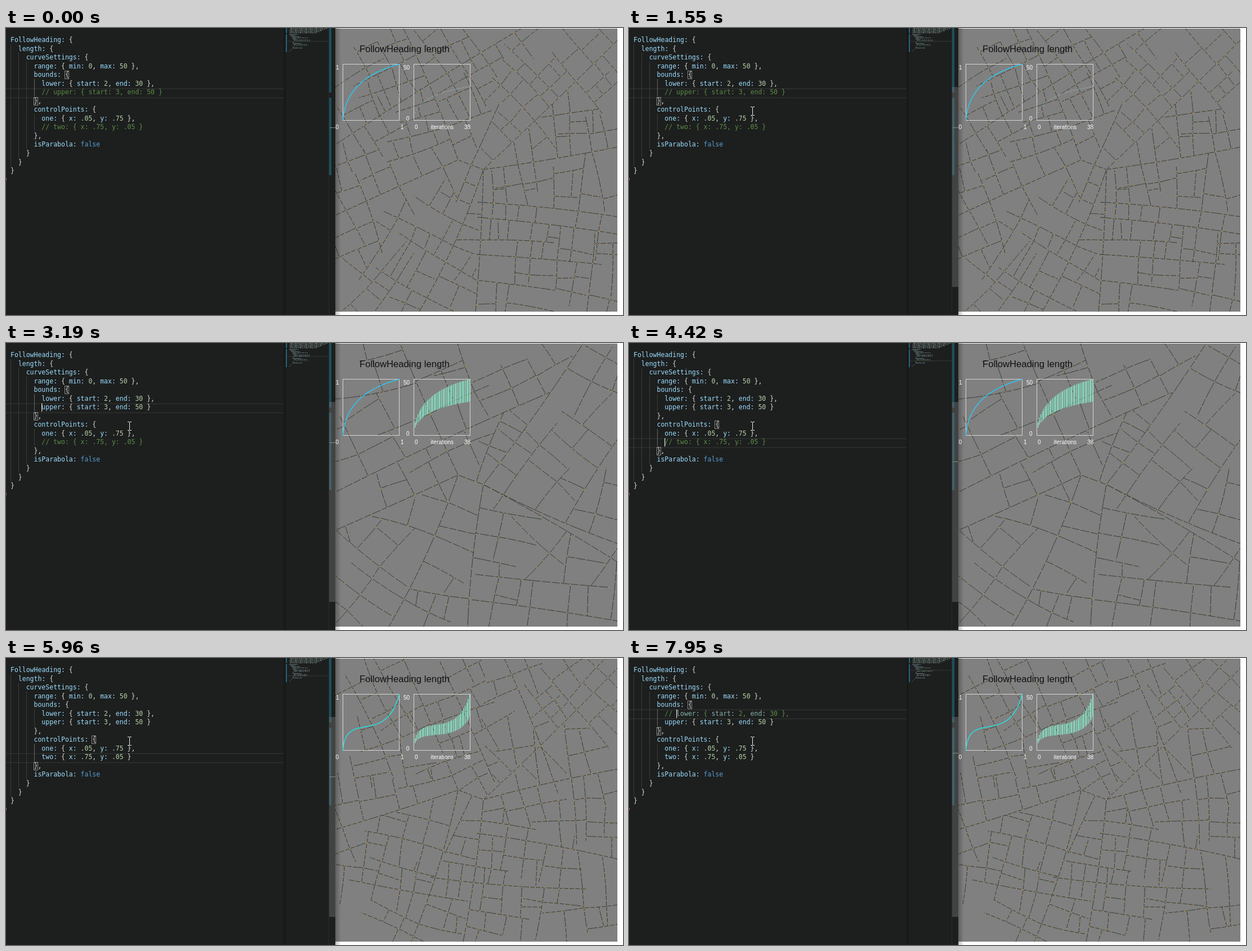
An HTML page with a canvas for the animation above (8000 ms loop, 1096 by 511 pixels).

```html
<!DOCTYPE html>
<html lang="en">
<head>
<meta charset="utf-8">
<title>Curve settings</title>
<style>
html, body { margin: 0; width: 100%; height: 100%; overflow: hidden; background: #fff; }
canvas { display: block; }
</style>
</head>
<body>
<canvas id="stage" width="1096" height="511"></canvas>
<script>
const LOOP = 8000, CHAR = 6.92, LEFT = 8, TOP = 21, PITCH = 15.54;
const ctx = document.getElementById('stage').getContext('2d');
const lineY = i => TOP + i * PITCH;
const colX = c => LEFT + c * CHAR;
const clamp = v => Math.max(0, Math.min(1, v));
const ease = p => p * p * (3 - 2 * p);

function rect(x, y, w, h, color) {
  ctx.fillStyle = color;
  ctx.fillRect(x, y, w, h);
}

function seeded(seed) {
  return () => {
    seed = (seed * 16807) % 2147483647;
    return seed / 2147483647;
  };
}

// ---- street maps: avenues from two hubs, side streets grown from them ----
const HUBS = [[803, 235], [848, 252]];
const cities = [
  {
    seed: 71, gap: 34, reach: 88, joint: 11,
    spokes: [[734, 505], [834, 505], [1086, 212], [1086, 22], [706, 1], [586, 333]],
    links: [[586, 207, 915, 1], [836, 310, 1086, 336], [836, 337, 1086, 367], [834, 403, 1058, 421]]
  },
  {
    seed: 52, gap: 58, reach: 120, joint: 17,
    spokes: [[680, 505], [820, 505], [1086, 390], [1086, 357], [1025, 1], [700, 1], [586, 333]],
    links: [[586, 265, 966, 88], [826, 457, 1086, 495], [834, 412, 1070, 435], [586, 333, 712, 433]]
  },
  {
    seed: 93, gap: 35, reach: 92, joint: 10,
    spokes: [[720, 505], [812, 505], [1086, 198], [1086, 18], [706, 1], [586, 305]],
    links: [[770, 5, 868, 222], [885, 1, 980, 240], [835, 312, 1086, 358], [752, 390, 1032, 411], [610, 395, 820, 433]]
  }
].map(city => drawCity(growCity(city), city.joint));

function avenue(x0, y0, x1, y1, bend) {
  const dx = x1 - x0, dy = y1 - y0, n = Math.ceil(Math.hypot(dx, dy) / 2);
  return Array.from({ length: n + 1 }, (_, i) => {
    const u = i / n, sag = bend * 4 * u * (1 - u);
    return [x0 + dx * u - dy * sag, y0 + dy * u + dx * sag];
  });
}

function growCity({ seed, gap, reach, spokes, links }) {
  const random = seeded(seed), spread = () => random() - .5;
  const taken = new Set(), roads = [];
  const cell = (x, y) => Math.floor(x / 5) * 1000 + Math.floor(y / 5);
  const inside = (x, y) => x > 585 && x < 1086 && y > 1 && y < 505;
  const add = (points, depth) => {
    points.forEach(p => taken.add(cell(...p)));
    roads.push({ points, depth });
  };

  // walk until another road, the edge or the length limit is met
  const grow = (x, y, heading) => {
    const points = [[x, y]], turn = spread() * .008, limit = reach * (.6 + random());
    for (let d = 2; d < limit; d += 2) {
      x += 2 * Math.cos(heading);
      y += 2 * Math.sin(heading);
      heading += turn;
      points.push([x, y]);
      if (!inside(x, y) || d > 8 && taken.has(cell(x, y))) break;
    }
    return points;
  };

  // a new street needs free ground on both sides
  const crowded = (x, y, a) => [-14, -7, 0, 7, 14].some(s =>
    taken.has(cell(x + 16 * Math.cos(a) - s * Math.sin(a), y + 16 * Math.sin(a) + s * Math.cos(a))));

  add(avenue(...HUBS[0], ...HUBS[1], 0), 0);
  for (const end of spokes) {
    const [near] = [...HUBS].sort((a, b) =>
      Math.hypot(a[0] - end[0], a[1] - end[1]) - Math.hypot(b[0] - end[0], b[1] - end[1]));
    add(avenue(...near, ...end, spread() * .05), 0);
  }
  for (const link of links) add(avenue(...link, spread() * .04), 0);

  for (const { points, depth } of roads) {
    if (depth > 2) continue;
    for (let i = Math.round(gap * (.3 + random() * .3)); i < points.length - 4; i += Math.round(gap * (.3 + random() * .4))) {
      const [x, y] = points[i], [px, py] = points[i - 1];
      for (const side of [-1, 1]) {
        const heading = Math.atan2(y - py, x - px) + side * Math.PI / 2 + spread() * .2;
        if (random() < .25 || crowded(x, y, heading)) continue;
        const street = grow(x, y, heading);
        if (street.length > 9) add(street, depth + 1);
      }
    }
  }
  return roads;
}

function drawCity(roads, joint) {
  const map = document.createElement('canvas');
  map.width = 1096;
  map.height = 511;
  const g = map.getContext('2d');
  g.beginPath();
  g.rect(585, 1, 501, 504);
  g.clip();
  g.fillStyle = '#808080';
  g.fillRect(585, 1, 501, 504);
  g.strokeStyle = '#343834';
  for (const { points } of roads) {
    g.beginPath();
    points.forEach(p => g.lineTo(...p));
    g.stroke();
  }
  let n = 0;
  for (const { points } of roads) {
    for (let d = 0; d < points.length; d += joint / 2) {
      const [x, y] = points[Math.floor(d)];
      g.fillStyle = n++ % 6 ? '#bd9a58' : '#4f7a58';
      g.fillRect(x - .8, y - .8, 1.6, 1.6);
    }
  }
  return map;
}

// ---- editor ----
// caret moves: time, line
const moves = [
  [0, 6], [1070, 6], [2080, 6], [3100, 6], [3800, 7], [4030, 8], [4200, 9], [4420, 10],
  [5200, 10], [6210, 9], [6530, 8], [6700, 7], [6870, 6], [7010, 5], [7870, 5]
];
const moveAt = t => moves.findLast(m => m[0] <= t) || moves[0];
const caretCol = t => t < 2080 ? 9 : t < 7870 ? 8 : 11;

function codeAt(t) {
  const off = on => on ? '// ' : '';
  return [
    'FollowHeading: {',
    '  length: {',
    '    curveSettings: {',
    '      range: { min: 0, max: 50 },',
    '      bounds: {',
    `        ${off(t >= 7870)}lower: { start: 2, end: 30 },`,
    `        ${off(t < 3100)}upper: { start: 3, end: 50 }`,
    '      },',
    '      controlPoints: {',
    '        one: { x: .05, y: .75 },',
    `        ${off(t < 5200)}two: { x: .75, y: .05 }`,
    '      },',
    '      isParabola: false',
    '    }',
    '  }',
    '}'
  ];
}

function tokenColor(token, comment, fresh) {
  const key = /^[a-z]\w*:/i.test(token);
  if (comment) return fresh && key ? '#86b3b0' : '#5b8a48';
  if (key) return '#9cdcfe';
  if (token === 'false') return '#569cd6';
  return /^[.\d]/.test(token) ? '#b5cea8' : '#d4d4d4';
}

function drawLine(text, i) {
  const comment = text.includes('//'), fresh = i === 5;
  for (const m of text.matchAll(/[a-z]\w*:?|[.\d]+|[^\w.\s]+/gi)) {
    ctx.fillStyle = tokenColor(m[0], comment, fresh);
    ctx.fillText(m[0], colX(m.index), Math.round(lineY(i) + 4));
  }
}

function drawMinimap(code, line) {
  rect(493, 0, 4, 511, '#181919');
  rect(498, 11 + 2 * line, 76, 1.5, '#2d3030');
  for (let row = 0; row < 5; row++) {
    for (let c = 0; c < 68 - row * 5; c++) {
      if ((c * 7 + row * 5) % 11 > 2) rect(504 + c, row * 2, .9, 1.2, c % 9 < 4 ? '#84918f' : '#5a6b69');
    }
  }
  code.forEach((text, i) => {
    const color = text.includes('//') ? '#3d5735' : '#71848b';
    [...text].forEach((ch, c) => ch !== ' ' && rect(503 + c, 11 + 2 * i, .8, 1.1, color));
  });
  rect(497, 0, 2, 9, '#24677c');
  rect(497, 11, 2, 32, '#24677c');
}

function drawEditor(t) {
  const code = codeAt(t), [since, line] = moveAt(t);
  rect(0, 0, 585, 511, '#1d1f1e');
  for (const dy of [-6.3, 9.4]) rect(0, Math.round(lineY(line) + dy) - .5, 494, 1.5, '#2e302f');

  // indent guides: column, first and last line
  const guides = [[0, 1, 14], [2, 2, 13], [4, 3, 12], [6, 5, 6], [6, 9, 10]];
  for (const [c, from, to] of guides) {
    const active = c === 6 && line >= from - 1 && line <= to + 1;
    rect(Math.round(colX(c)), lineY(from) - 8, 1, (to - from + 1) * PITCH, active ? '#666' : '#3b3d3c');
  }

  // the enclosing bracket pair follows the caret a little later
  const at = moveAt(t - 70)[1];
  const [open, close] = at < 7 ? [4, 7] : at < 9 ? [2, 13] : [8, 11];
  ctx.strokeStyle = '#888';
  for (const [c, i] of [[code[open].length - 1, open], [code[close].indexOf('}'), close]]) {
    ctx.strokeRect(Math.round(colX(c)) - .5, Math.round(lineY(i)) - 6.5, 7, 14);
  }

  ctx.font = '11.5px "DejaVu Sans Mono", monospace';
  code.forEach(drawLine);
  if (since && t - since < 480) rect(Math.floor(colX(caretCol(t))), lineY(line) - 7, 1.3, 15, '#d8d8d8');
  rect(0, 267, 1, 4, '#b8692c');

  drawMinimap(code, line);
  rect(573, 0, 1, 511, '#292b2a');
  rect(574, 0, 4, 115, '#1b5060');
  rect(574, 124, 4, 138, '#1b5060');
  ctx.globalAlpha = clamp((t - 250) / 300);
  rect(574, 105, 11, 356, 'rgba(121,121,121,.4)');
  ctx.globalAlpha = 1;
  rect(575, Math.round(177 + 8.5 * (line - 6)), 10, 1, '#8a8a8a');
}

// ---- charts ----
// one control point gives a quadratic curve, two give a cubic one
function curve(u, cubic) {
  const v = 1 - u;
  if (!cubic) return [.1 * u * v + u * u, 1.5 * u * v + u * u];
  return [.15 * v * v * u + 2.25 * v * u * u + u ** 3, 2.25 * v * v * u + .15 * v * u * u + u ** 3];
}

function curveY(x, cubic) {
  let lo = 0, hi = 1;
  for (let i = 0; i < 24; i++) {
    const mid = (lo + hi) / 2;
    if (curve(mid, cubic)[0] < x) lo = mid; else hi = mid;
  }
  return curve(lo, cubic)[1];
}

function label(text, x, y) {
  ctx.fillStyle = '#fff';
  ctx.fillText(text, x, y);
}

function drawCharts(t) {
  const cubic = t >= 5960, banded = t >= 3190;
  ctx.fillStyle = '#111';
  ctx.font = '16.65px "Liberation Sans", Arial, sans-serif';
  ctx.fillText('FollowHeading length', 628, 43);
  ctx.font = '10px "Liberation Sans", Arial, sans-serif';
  label('1', 586, 74);
  label('0', 585.5, 180);
  label('1', 701, 180);
  label('50', 706, 74);
  label('0', 711, 165);
  label('0', 726, 180);
  label('iterations', 754.5, 180);
  label('38', 814, 180);

  ctx.strokeStyle = '#d6d6d6';
  for (const x of [598.5, 724.5]) ctx.strokeRect(x, 64.5, 100, 100);

  ctx.strokeStyle = cubic ? '#22e2e0' : '#2cc6f5';
  ctx.lineWidth = 1.5;
  ctx.beginPath();
  for (let i = 0; i <= 50; i++) {
    const [x, y] = curve(i / 50, cubic);
    ctx.lineTo(598.5 + 100 * x, 164.5 - 100 * y);
  }
  ctx.stroke();
  ctx.lineWidth = 1;

  for (let i = 1; i <= 38; i++) {
    const x = Math.round(724 + i * 100 / 38), y = curveY(i / 38, cubic);
    const low = 164.5 - 2 * (2 + 28 * y), high = 164.5 - 2 * (3 + 47 * y);
    if (banded) rect(x - 1, high, 1.5, low - high, '#86e6c6');
    else rect(x - .5, low - .5, 1, 1, '#a9dcd8');
  }
}

// ---- pointer ----
function pointerAt(t) {
  const stepped = (start, gap, n) => ease(clamp((Math.floor((t - start) / gap) + 1) / n));
  if (t < 70) return null;
  if (t < 940) {
    const p = stepped(70, 76, 11);
    return [625 - 551 * p, 8 + 114 * p];
  }
  const p = stepped(940, 72, 6);
  return [74 + 145 * p, 122 + 26 * p];
}

function drawPointer(t) {
  const pos = pointerAt(t);
  if (!pos) return;
  const [x, y] = pos.map(Math.round);
  if (x < 494) {
    for (const dx of [-3, 1]) {
      rect(x + dx, y - 8, 3, 1, '#eee');
      rect(x + dx, y + 7, 3, 1, '#eee');
    }
    rect(x, y - 7, 1, 14, '#eee');
    return;
  }
  ctx.beginPath();
  for (const [dx, dy] of [[0, 0], [0, 16], [4, 12], [7, 18], [9, 17], [6, 11], [11, 11]]) ctx.lineTo(x + dx, y + dy);
  ctx.closePath();
  ctx.fillStyle = '#fff';
  ctx.fill();
  ctx.strokeStyle = '#000';
  ctx.stroke();
}

function draw(now) {
  const t = now % LOOP;
  rect(0, 0, 1096, 511, '#fff');
  ctx.drawImage(cities[t < 3190 ? 0 : t < 5960 ? 1 : 2], 0, 0);
  const shade = ctx.createLinearGradient(585, 0, 595, 0);
  shade.addColorStop(0, 'rgba(0,0,0,.25)');
  shade.addColorStop(1, 'rgba(0,0,0,0)');
  rect(585, 0, 10, 511, shade);
  drawCharts(t);
  drawEditor(t);
  drawPointer(t);
}

const start = performance.now();
function tick() {
  draw(performance.now() - start);
  requestAnimationFrame(tick);
}
tick();
</script>
</body>
</html>
```
